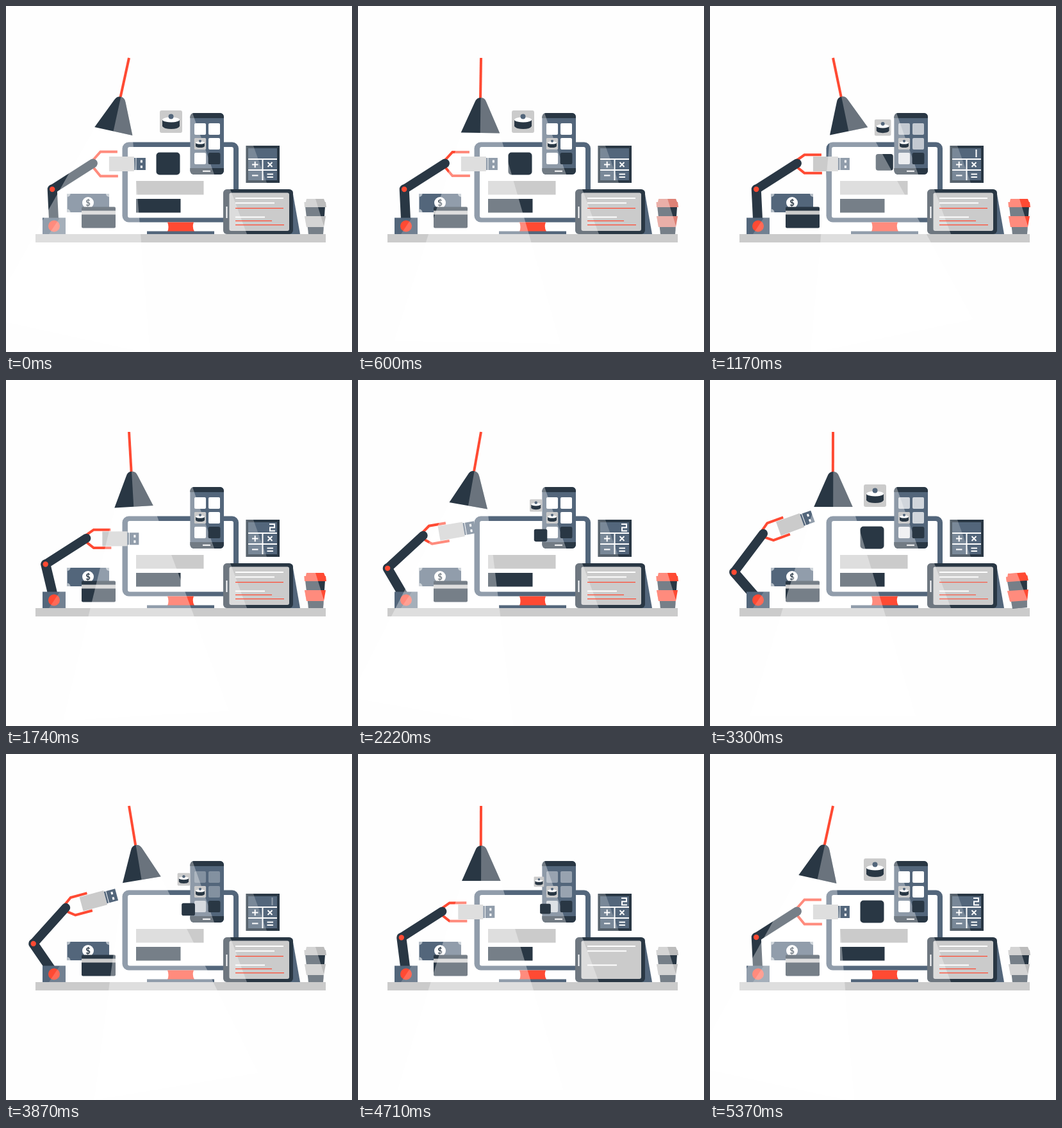
These frames come from a looping animation (540 px wide and 540 px high, 5400 ms). An HTML page:

```html
<!DOCTYPE html>
<html lang="en">
<head>
<meta charset="utf-8">
<title>Desk scene</title>
<style>
  html, body { margin: 0; width: 100%; height: 100%; overflow: hidden; background: #fefefe; }
  svg { display: block; width: 100vw; height: 100vh; }
  .dark { fill: #293744; }
  .slate { fill: #53667b; }
  .grey { fill: #cbcbcb; }
  .red { fill: #ff4a33; }
  .white { fill: #fff; }
  .line { fill: none; stroke: #fff; stroke-width: 2; }
  .redline { fill: none; stroke: #ff4a33; }
  .limb { stroke: #293744; stroke-linecap: round; }
</style>
</head>
<body>
<svg viewBox="0 0 540 540">
  <defs>
    <g id="drum">
      <rect class="grey" x="-17.5" y="-17.5" width="35" height="35" rx="3"/>
      <path class="dark" d="M-13.500 -3V7Q-11 11.500 0 11.500T13.500 7V-3Z"/>
      <ellipse class="white" cy="-3" rx="13.500" ry="4"/>
      <circle class="slate" cy="-8" r="4"/>
    </g>
    <rect id="app" class="dark" x="-18.500" y="-17.500" width="37" height="35" rx="5"/>
    <clipPath id="phoneClip"><rect x="287.500" y="167" width="52.500" height="96" rx="6"/></clipPath>
    <clipPath id="tabletClip"><rect x="339" y="286" width="109" height="70" rx="6"/></clipPath>
    <clipPath id="cupClip"><path d="M469 301H497L498 306H500V314H498V328H499L496 345L495 356H472L469 345L466 328H467L465.500 306H468Z"/></clipPath>
  </defs>

  <rect class="grey" x="46" y="356" width="453" height="13"/>

  <g id="monitor">
    <rect class="slate" x="181.500" y="212.500" width="181.500" height="125" rx="10"/>
    <rect class="white" x="190" y="220" width="165" height="110.500" rx="3"/>
    <path class="red" d="M252 337.500H293Q290 345 294 352H252Q255 345 252 337.500Z"/>
    <rect class="slate" x="220" y="351.500" width="105" height="4.500"/>
    <rect class="grey" x="203" y="273" width="105.500" height="21.500"/>
    <rect class="dark" x="203" y="301" width="69.500" height="21.500"/>
  </g>

  <g id="money">
    <rect class="slate" x="95.500" y="293" width="65.500" height="29"/>
    <path fill="#b5bec7" d="M95.500 293h5a5 5 0 0 1-5 5zM161 293h-5a5 5 0 0 0 5 5zM95.500 322h5a5 5 0 0 0-5-5z"/>
    <circle class="white" cx="128" cy="307" r="9"/>
    <text class="dark" x="128" y="311.700" font-family="Lato, sans-serif" font-size="13" font-weight="700" text-anchor="middle">$</text>
    <rect class="dark" x="118" y="313.500" width="53" height="33" rx="2"/>
    <rect class="grey" x="118" y="319.500" width="53" height="6"/>
  </g>

  <g id="calculator">
    <rect class="dark" x="374.500" y="218" width="52.500" height="58"/>
    <path class="slate" d="M378 222h45v50h-45z"/>
    <path fill="#fff" opacity=".22" d="M374.500 218H386L407 276H374.500Z"/>
    <path class="line" d="M378 239H423M400.500 240V272M378 256H423M384 247.500h9.500M388.700 242.800v9.500M408.500 244l7 7m0-7l-7 7M384 264.500h9.500M407.500 262.500h9.500M407.500 267h9.500"/>
    <path id="one" class="line" d="M415.500 224V236"/>
    <path id="two" class="line" d="M411 225H419V230.300H412V235.500H420"/>
  </g>

  <g id="phone" clip-path="url(#phoneClip)">
    <path class="slate" d="M287 167h53v96h-53z"/>
    <path class="dark" d="M287 167h53v8h-53zM287 253h53v10h-53z"/>
    <path fill="#fff" opacity=".34" d="M287 167H291L325 263H287Z"/>
    <path class="line" stroke-width="1.500" d="M307 257.800H319"/>
    <g id="tiles" class="white">
      <rect x="294" y="183" width="18" height="18" rx="2"/>
      <rect x="316" y="183" width="18" height="18" rx="2"/>
      <rect x="316" y="206" width="18" height="18" rx="2"/>
    </g>
    <rect id="lowTile" class="white" x="294" y="229" width="18" height="18" rx="2"/>
    <use href="#drum" transform="translate(303 215) scale(.52)"/>
    <use href="#app" transform="translate(325 238) scale(.51)"/>
  </g>

  <path class="slate" d="M440 289L447 288L459 356H440Z"/>
  <g id="tablet" clip-path="url(#tabletClip)">
    <path class="dark" d="M339 286h109v70H339z"/>
    <rect class="grey" x="348.500" y="291.500" width="93.500" height="59.500" rx="3"/>
    <path fill="#fff" opacity=".32" d="M339 286H350L376 356H339Z"/>
    <path class="line" stroke-width="1.600" d="M344.500 313V331M358 300H433M358 307.500H419M358 329.500H404"/>
    <path id="redLines" class="redline" stroke-width="1.200" d="M358 315.600H433M358 335.300H415M358 341.600H434"/>
  </g>

  <g id="cup">
    <path class="dark" d="M467 313H498L495 356H472Z"/>
    <path id="cupColour" d="M469 301H496L498 306H499L500 314H466L465.500 306H468ZM466 328H499L496 345H469Z"/>
    <path clip-path="url(#cupClip)" fill="#fff" opacity=".36" d="M460 301H483L500 356H460Z"/>
  </g>

  <g id="arm">
    <g id="hand">
      <path id="claw" class="redline" stroke-width="4"/>
      <rect class="grey" x="25" y="-10.500" width="39" height="23"/>
      <rect class="slate" x="64" y="-8.500" width="2.500" height="19"/>
      <rect class="slate" x="67.500" y="-8.500" width="14.500" height="19"/>
      <path class="white" d="M74-5h3v4h-3zM74 3.500h3v4h-3z"/>
    </g>
    <line id="lower" class="limb" x1="75" y1="343" stroke-width="15"/>
    <line id="upper" class="limb" stroke-width="14"/>
    <circle id="elbow" class="red" r="4.200"/>
    <rect class="slate" x="57" y="330.500" width="36" height="25.500"/>
    <circle class="red" cx="75" cy="343.500" r="9"/>
    <path fill="#fff" opacity=".18" d="M84 330.500H93V356H67Z"/>
  </g>

  <use id="bigDrum" href="#drum"/>
  <use id="bigApp" href="#app"/>

  <g id="lamp">
    <path fill="#fff" opacity=".36" d="M163 198H223L323 525H63Z"/>
    <path class="redline" stroke-width="4" d="M192 81V146"/>
    <path class="dark" d="M162.500 198L183.500 150Q186 143 192.500 143T201.500 150L223 198Z"/>
    <path fill="#fff" opacity=".3" d="M192.500 143Q199 143 201.500 150L223 198H192.500Z"/>
  </g>
</svg>
<script>
const LOOP = 5400;
const el = id => document.getElementById(id);
const set = (id, attrs) => {
  for (const name in attrs) el(id).setAttribute(name, attrs[name]);
};
const ease = p => (1 - Math.cos(Math.PI * p)) / 2;
const mix = (a, b, p) => a + (b - a) * p;
const rad = deg => deg * Math.PI / 180;

// Eased value through [time, value] pairs.
function track(t, keys) {
  if (t <= keys[0][0]) return keys[0][1];
  for (let i = 1; i < keys.length; i++) {
    const [t0, v0] = keys[i - 1], [t1, v1] = keys[i];
    if (t < t1) return mix(v0, v1, ease((t - t0) / (t1 - t0)));
  }
  return keys[keys.length - 1][1];
}

function drawLamp(t) {
  const tilt = track(t, [[0, 12.3], [1250, -12], [2450, 12.2], [4080, -10.3], [5400, 12.3]]);
  set('lamp', { transform: `rotate(${tilt} 192 81)` });
}

function drawArm(t) {
  const reach = track(t, [[1160, 0], [2800, 1], [3420, 1], [5080, 0]]);
  const lift = track(t, [[1700, 0], [2750, 1], [3420, 1], [4800, 0]]);
  const lean = rad(mix(2.8, 41, reach));
  const raise = rad(mix(32.5, 53, lift));
  const x = 75 - 57 * Math.sin(lean), y = 343 - 57 * Math.cos(lean);
  const hx = x + 75.5 * Math.cos(raise), hy = y - 75.5 * Math.sin(raise);
  const grip = track(t, [[0, 19], [500, 19], [1000, 14.2], [4850, 14.2], [5300, 19]]);
  set('lower', { x2: x, y2: y });
  set('upper', { x1: x, y1: y, x2: hx, y2: hy });
  set('elbow', { cx: x, cy: y });
  set('hand', { transform: `translate(${hx} ${hy}) rotate(${-20 * lift})` });
  set('claw', { d: `M38 ${1 - grip}H11.500L0 -5M0 6L11.500 ${1 + grip}H39` });
}

function drawIcons(t) {
  const p = track(t, [[960, 0], [1570, 1], [1900, 1], [2500, 0], [3590, 0], [4200, 1], [4420, 1], [5040, 0]]);
  const place = (id, x, y, slotX, slotY) => set(id, {
    transform: `translate(${mix(x, slotX, p)} ${mix(y, slotY, p)}) scale(${1 - p})`
  });
  place('bigDrum', 257.5, 180.5, 303, 215);
  place('bigApp', 253, 246, 325, 238);
}

function drawScreens(t) {
  const tile = track(t, [[700, 1], [1170, .65], [1650, 1], [2900, 1], [3870, .28], [4710, .4], [5200, 1]]);
  set('tiles', { opacity: tile });
  set('lowTile', { opacity: 1 - (1 - tile) / 2 });
  set('one', { opacity: t < 2700 ? track(t, [[800, 0], [1050, 1], [1400, 1], [1450, 0]])
                                 : track(t, [[3780, 0], [4000, 1], [4350, 1], [4400, 0]]) });
  set('two', { opacity: t < 2700 ? track(t, [[1420, 0], [1470, 1], [2300, 1], [2450, 0]])
                                 : track(t, [[4370, 0], [4420, 1]]) });
  set('redLines', { opacity: track(t, [[2460, 1], [2800, 0], [3000, 0], [3400, 1], [4250, 1], [4600, 0], [4800, 0], [5200, 1]]) });
}

function drawCup(t) {
  const wobble = start => {
    const p = (t - start) / 800;
    return p > 0 && p < 1 ? 7 * Math.sin(p * Math.PI * 4) * Math.sin(p * Math.PI) : 0;
  };
  const warm = track(t, [[450, 0], [750, 1], [3300, 1], [3600, 0]]);
  const channel = (a, b) => Math.round(mix(a, b, warm));
  set('cup', { transform: `rotate(${wobble(200) + wobble(3050)} 483 356)` });
  set('cupColour', { fill: `rgb(${channel(188, 255)},${channel(188, 74)},${channel(188, 51)})` });
}

function render(now) {
  const t = now % LOOP;
  [drawLamp, drawArm, drawIcons, drawScreens, drawCup].forEach(draw => draw(t));
}

const start = performance.now();
function tick() {
  render(performance.now() - start);
  requestAnimationFrame(tick);
}
tick();
</script>
</body>
</html>
```
